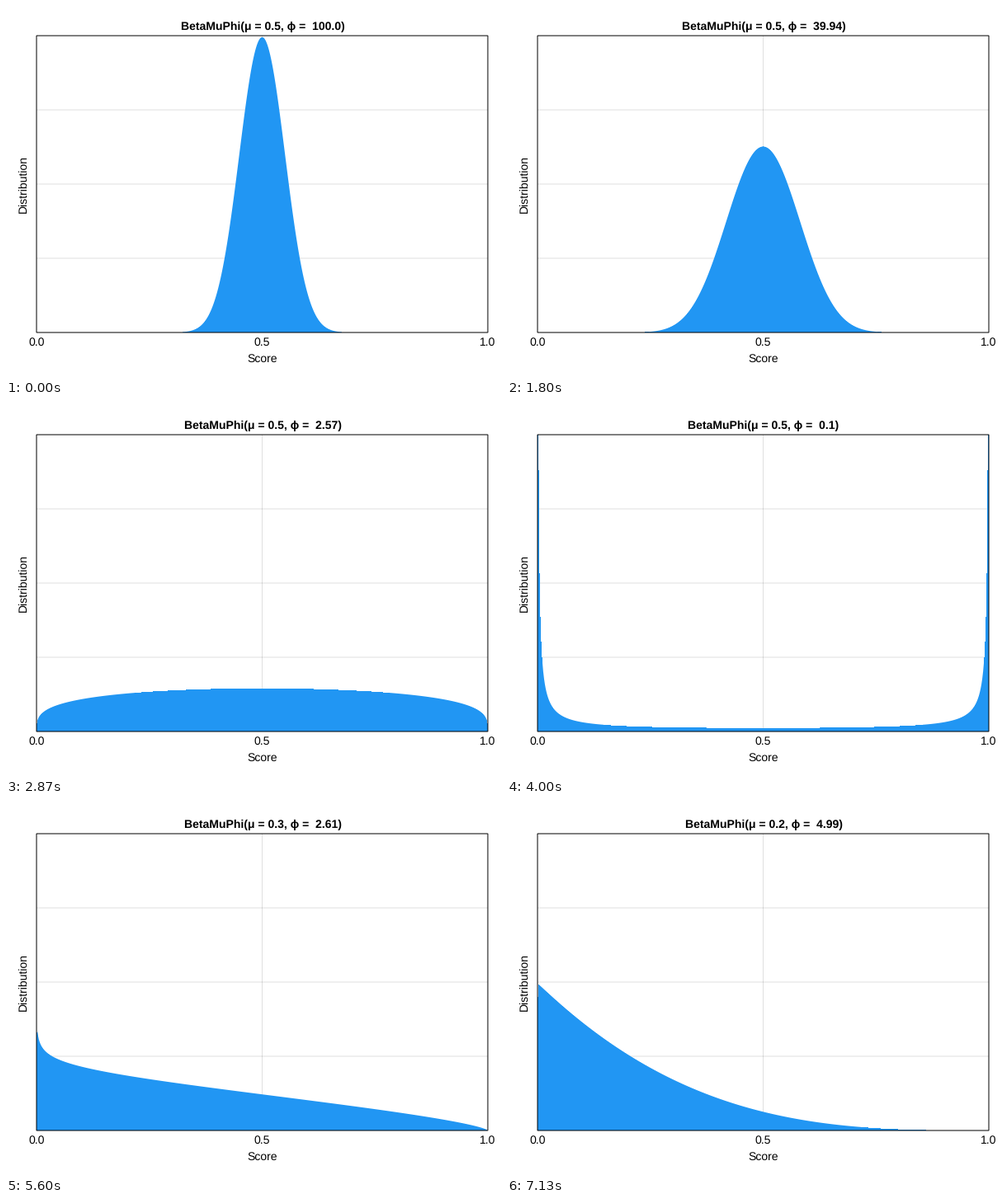
A matplotlib script for the animation above (8000 ms loop, 600 by 450 pixels).

```python
import math

import numpy as np
import matplotlib.pyplot as plt
from matplotlib.animation import FuncAnimation
from matplotlib.patches import Rectangle

W, H, DPI = 600, 450, 100
LEFT, RIGHT, TOP, BOTTOM = 37, 584, 36, 396
Y_MAX = 8
FRAMES, FPS = 120, 15
LAST = 239            # index at which the full timeline reaches 1
PX = 72 / DPI         # one pixel in points

plt.rcParams["font.family"] = ["Liberation Sans", "DejaVu Sans"]
plt.rcParams["text.hinting"] = "none"

grid = np.linspace(0, 1, 1000)
cols = (np.arange(RIGHT - LEFT) + 0.5) / (RIGHT - LEFT)
rows = (BOTTOM - TOP) - 0.5 - np.arange(BOTTOM - TOP)


def ease(t, start, end):
    u = min(max((t - start) / (end - start), 0), 1)
    return (1 - math.cos(math.pi * u)) / 2


def params(i):
    """Mean and precision; each move stops on its last whole step."""
    if i < 0.25 * LAST:
        t = min(i, math.floor(0.2 * LAST)) / LAST
        return 0.5, 100 - 99.9 * ease(t, 0, 0.2)
    t = min(i, math.floor(0.45 * LAST)) / LAST
    e = ease(t, 0.25, 0.45)
    return 0.5 - 0.3 * e, 0.1 + 4.9 * e


def beta_pdf(mu, phi):
    a, b = mu * phi, (1 - mu) * phi
    log_b = math.lgamma(a) + math.lgamma(b) - math.lgamma(phi)
    y = np.zeros_like(grid)
    x = grid[1:-1]
    y[1:-1] = np.exp((a - 1) * np.log(x) + (b - 1) * np.log1p(-x) - log_b)
    return y


def coverage(mu, phi):
    """Opacity of the filled area: soft on slopes, stepped on flat or steep runs."""
    h = np.interp(cols, grid, beta_pdf(mu, phi)) * (BOTTOM - TOP) / Y_MAX
    slope = np.abs(np.gradient(h[1:-1]))
    soft = np.full_like(h, 1e-3)
    soft[1:-1] = np.where((slope < 0.08) | (slope > 12), 1e-3, np.maximum(slope, 1))
    return np.clip((h - rows[:, None]) / soft + 0.5, 0, 1)


fig = plt.figure(figsize=(W / DPI, H / DPI), dpi=DPI, facecolor="white")
ax = fig.add_axes([0, 0, 1, 1])
ax.axis("off")


def label(x, y, s, **kw):
    return ax.text(x, y, s, size=14 * PX, color="black", ha="center",
                   va="baseline", **kw)


def grid_line(xs, ys):
    ax.plot(xs, ys, color="black", alpha=0.12, lw=PX, snap=False,
            solid_capstyle="butt", zorder=1)


mid = (LEFT + RIGHT) / 2
grid_line([mid, mid], [TOP, BOTTOM])
for k in (1, 2, 3):
    y = BOTTOM - k * (BOTTOM - TOP) / 4
    grid_line([LEFT, RIGHT], [y, y])

pixels = np.empty((BOTTOM - TOP, RIGHT - LEFT, 4))
pixels[..., :3] = np.array([33, 150, 243]) / 255
pixels[..., 3] = 0
area = ax.imshow(pixels, extent=(LEFT, RIGHT, BOTTOM, TOP), aspect="auto",
                 interpolation="nearest", zorder=2)

ax.add_patch(Rectangle((LEFT, TOP), RIGHT - LEFT, BOTTOM - TOP, fill=False,
                       ec="black", lw=PX, snap=False, zorder=3))

for x, s in ((LEFT, "0.0"), (mid, "0.5"), (RIGHT, "1.0")):
    label(x, 412, s)
label(mid, 432, "Score")
ax.text(28, 216, "Distribution", size=14 * PX, color="black", rotation=90,
        ha="right", va="center")
title = label(mid + 0.5, 29, "", weight="bold")

ax.set_xlim(0, W)
ax.set_ylim(H, 0)


def update(i):
    mu, phi = params(i)
    pixels[..., 3] = coverage(mu, phi)
    area.set_data(pixels)
    title.set_text(f"BetaMuPhi(μ = {round(mu, 1)}, ϕ =  {round(phi, 2)})")
    return area, title


anim = FuncAnimation(fig, update, frames=FRAMES, interval=1000 / FPS,
                     init_func=lambda: update(0), repeat=True, repeat_delay=0)
plt.show()
```
